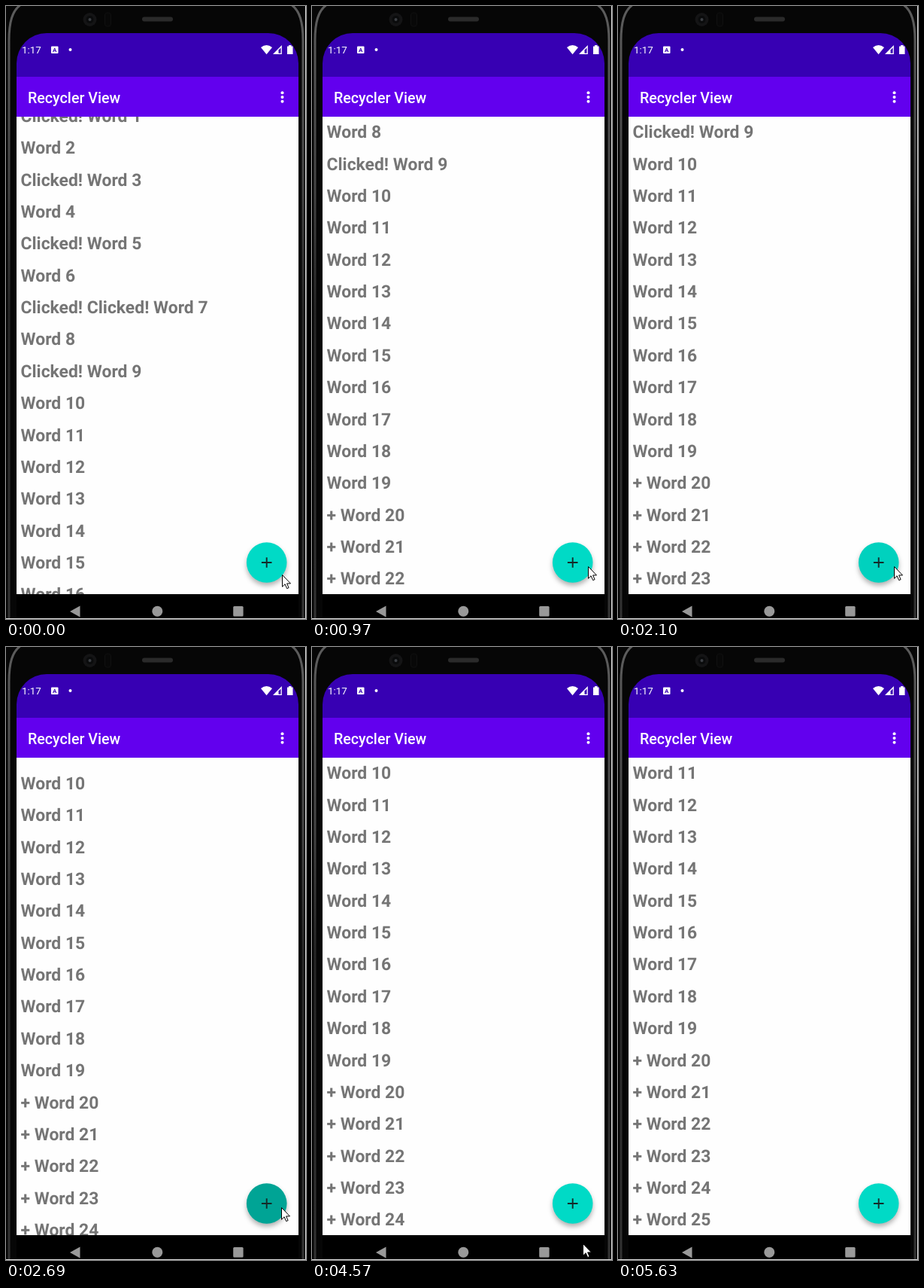
These frames come from a looping animation (399 px wide and 814 px high, 6.28 s). An HTML page:

```html
<!DOCTYPE html>
<html lang="en">
<head>
<meta charset="utf-8">
<title>Recycler View</title>
<style>
html, body { margin: 0; width: 100%; height: 100%; overflow: hidden; background: #000; }
svg { display: block; width: 399px; height: 814px; font-family: Roboto, sans-serif; }
#rows { font-size: 22.9px; font-weight: 700; fill: #757575; text-rendering: geometricPrecision; }
#fab { filter: drop-shadow(0 4px 3px rgba(0, 0, 0, .3)); }
</style>
</head>
<body>
<svg viewBox="0 0 399 814">
  <defs>
    <linearGradient id="edge" x1="0" y1="0" x2="0" y2="814" gradientUnits="userSpaceOnUse">
      <stop offset="0" stop-color="#5c5c5c"/>
      <stop offset=".3" stop-color="#444"/>
      <stop offset=".5" stop-color="#262626"/>
      <stop offset="1" stop-color="#333"/>
    </linearGradient>
    <clipPath id="list"><rect x="14" y="147" width="375" height="634"/></clipPath>
    <clipPath id="button"><circle cx="346.7" cy="739" r="26.8"/></clipPath>
  </defs>

  <!-- phone body -->
  <rect width="399" height="814" fill="#060606"/>
  <path d="M20 -2C8 6 4 22 4 46V814M379 -2C391 6 395 22 395 46V814" fill="none" stroke="url(#edge)" stroke-width="3"/>
  <circle cx="111.5" cy="18" r="9" fill="#141415"/>
  <circle cx="111.5" cy="18" r="5" fill="#0a0b0c"/>
  <circle cx="111.5" cy="18" r="2" fill="#3c3f44"/>
  <rect x="131.5" y="9" width="8" height="18" rx="3" fill="#080808" stroke="#101010"/>
  <rect x="181" y="14.5" width="41" height="6" rx="3" fill="#2a2a2a"/>

  <!-- status and app bars -->
  <path d="M14 94V76A40 40 0 0 1 54 36H349A40 40 0 0 1 389 76V94Z" fill="#3700b3"/>
  <rect x="14" y="94" width="375" height="53" fill="#6200ee"/>
  <g fill="#fff">
    <text x="21" y="63" font-size="13.4">1:17</text>
    <rect x="60" y="53.5" width="9.5" height="9.5" rx="1"/>
    <circle cx="85.5" cy="58" r="2"/>
    <path d="M339 55Q346.500 49 354 55L346.500 64.300Z"/>
    <path d="M366.800 52V64H355Z"/>
    <path d="M374 53.500H376V52H379.500V53.500H381.500V64H374Z"/>
    <text x="28.9" y="128.8" font-size="19.7" font-weight="500">Recycler View</text>
    <circle cx="367.5" cy="115.3" r="2"/>
    <circle cx="367.5" cy="121" r="2"/>
    <circle cx="367.5" cy="126.7" r="2"/>
  </g>
  <path d="M362.500 58.500L365.500 55.500V62.700H362.500Z" fill="#3700b3"/>
  <text x="64.75" y="61.2" font-size="8" font-weight="700" text-anchor="middle" fill="#3700b3">A</text>

  <!-- list -->
  <rect x="14" y="147" width="375" height="634" fill="#fefefe"/>
  <g clip-path="url(#list)"><g id="rows"></g></g>

  <!-- navigation bar -->
  <rect x="14" y="781" width="375" height="33" fill="#000"/>
  <g fill="#999">
    <path d="M85 804L98.500 796.500V811.500Z"/>
    <circle cx="201.3" cy="803.7" r="7"/>
    <rect x="302.2" y="797" width="13.4" height="13.6" rx="1.5"/>
  </g>
  <path d="M398.500 0V813.500H0" fill="none" stroke="#e4e4e4"/>

  <circle id="fab" cx="346.7" cy="739" r="26.8" fill="#00dac6"/>
  <g clip-path="url(#button)"><circle id="ripple" cx="366" cy="746.5"/></g>
  <path d="M339.900 739H353.500M346.700 732.200V745.800" stroke="#142b29" stroke-width="1.9"/>
  <path id="cursor" d="M.5 .5V16.200L4.100 12.700L6.700 18.600L9.100 17.500L6.600 11.900H11.500Z" fill="#fff" stroke="#000"/>
</svg>
<script>
const LOOP = 6280, STEP = 42.37, BASELINE = 175.25;
const START_ROW = 1.505, LAST_TOP = 8;
const PRESSES = [540, 1700, 2500, 4930];
const STALLS = [[270, 820], [4810, 5210]]; // the screen freezes
// waypoints: time, x, y
const PATH = [[0, 366.5, 755], [270, 367, 744], [2690, 367, 744], [3100, 142, 716],
  [3240, 207, 701], [3400, 165, 717], [3670, 197, 681], [4570, 360, 792],
  [4810, 351, 750], [5210, 351, 750], [5480, 366, 801], [LOOP, 366, 801]];

const $ = id => document.getElementById(id);
const set = (id, attrs) => {
  for (const name in attrs) $(id).setAttribute(name, attrs[name]);
};
const clamp = v => Math.min(1, Math.max(0, v));
const easeOut = u => 1 - (1 - clamp(u)) ** 2;

function label(n) {
  const clicks = n === 7 ? 2 : n < 10 ? n % 2 : 0;
  return "Clicked! ".repeat(clicks) + (n > 19 ? "+ " : "") + "Word " + n;
}

for (let n = 1; n <= 25; n++) {
  const row = document.createElementNS("http://www.w3.org/2000/svg", "text");
  row.setAttribute("x", 19.5);
  row.setAttribute("y", BASELINE + n * STEP);
  row.textContent = label(n);
  $("rows").append(row);
}

// each press adds a row and scrolls to the new end of the list
function topRow(t) {
  return PRESSES.reduce((top, at, i) =>
    top + (LAST_TOP + i - top) * easeOut((t - at - 100) / 210), START_ROW);
}

function ripple(t) {
  const age = t - (PRESSES.findLast(at => at <= t) ?? -LOOP);
  return { r: 14 + age / 5, opacity: .25 * clamp(age / 60) * clamp((420 - age) / 120) };
}

function pointer(t) {
  const i = PATH.findIndex(p => p[0] > t);
  const [t0, x0, y0] = PATH[i - 1], [t1, x1, y1] = PATH[i];
  const u = (t - t0) / (t1 - t0);
  const away = t >= 3820 && t < 4570 || t >= 5630;
  return {
    transform: `translate(${Math.round(x0 + (x1 - x0) * u)} ${Math.round(y0 + (y1 - y0) * u)})`,
    visibility: away ? "hidden" : "visible"
  };
}

function draw(now) {
  const time = now % LOOP;
  const stall = STALLS.find(([from, to]) => time >= from && time < to);
  const t = stall ? stall[0] : time;
  set("rows", { transform: `translate(0 ${-topRow(t) * STEP})` });
  set("ripple", ripple(t));
  set("cursor", pointer(t));
}

const start = performance.now();
function tick() {
  draw(performance.now() - start);
  requestAnimationFrame(tick);
}
tick();
</script>
</body>
</html>
```
